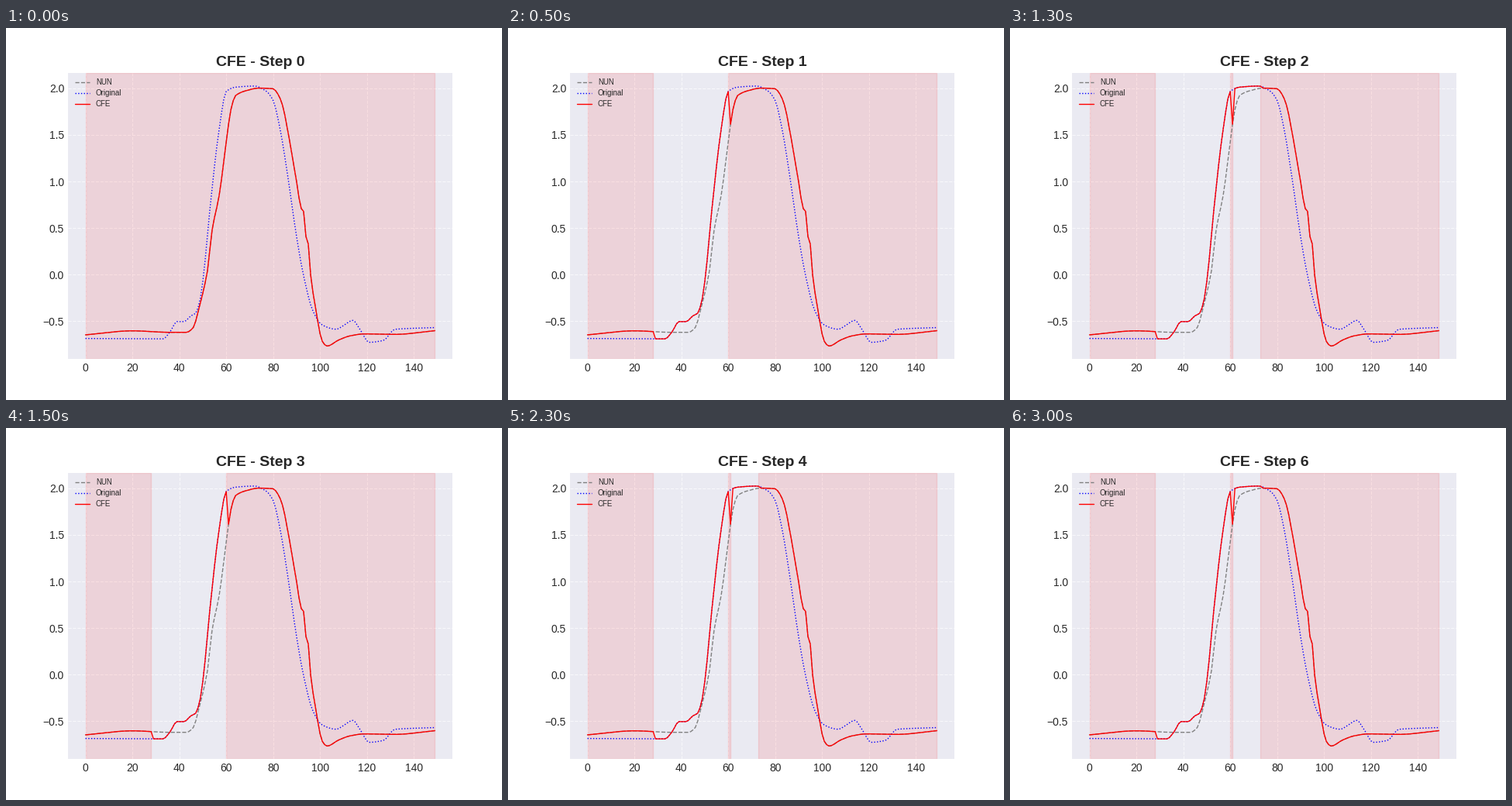
These frames come from a looping animation (640 by 480 pixels, 3500 ms). A matplotlib script:

```python
import matplotlib.pyplot as plt
import numpy as np
from matplotlib.animation import FuncAnimation

plt.rcParams.update({
    "font.family": "Liberation Sans",
    "text.color": ".15",
    "xtick.color": ".15",
    "ytick.color": ".15",
    "xtick.major.size": 0,
    "ytick.major.size": 0,
    "axes.facecolor": "#EAEAF2",
    "axes.edgecolor": "white",
    "axes.linewidth": 0,
    "axes.axisbelow": True,
    "grid.color": "white",
    "lines.solid_capstyle": "round",
    "legend.frameon": False,
})

LAST = 149
STEPS = 7
t = np.arange(LAST + 1)


def smooth(*keys):
    """Monotone cubic curve through the key points, sampled at every t."""
    x, y = np.array(keys, float).T
    h = np.diff(x)
    slope = np.diff(y) / h
    a, b = slope[:-1], slope[1:]
    same = a * b > 0
    inner = np.where(same, 2 * a * b / np.where(same, a + b, 1), 0)
    m = np.concatenate([slope[:1], inner, slope[-1:]])
    i = np.clip(np.searchsorted(x, t, side="right") - 1, 0, len(h) - 1)
    u = (t - x[i]) / h[i]
    ease = u * u * (3 - 2 * u)
    bend = h[i] * u * (1 - u) * ((1 - u) * m[i] - u * m[i + 1])
    return y[i] + (y[i + 1] - y[i]) * ease + bend


base = smooth(
    (0, -.684), (33, -.688), (36, -.615), (39, -.503), (42, -.503),
    (45, -.44), (47, -.413), (49, -.25), (51, .15), (53, .69),
    (57, 1.56), (60, 1.965), (64, 2.012), (72, 2.024), (77, 1.97),
    (80, 1.87), (83, 1.56), (86, 1.1), (90, .41), (93, -.01),
    (97, -.39), (101, -.54), (107, -.585), (110, -.545), (114, -.49),
    (117, -.585), (121, -.725), (127, -.705), (132, -.585), (149, -.567))

neighbour = smooth(
    (0, -.645), (20, -.602), (36, -.618), (43, -.618), (46, -.565),
    (48, -.4), (51, -.09), (52, .04), (54, .48), (57, .85),
    (60, 1.42), (62, 1.77), (64, 1.922), (69, 1.978), (74, 2.002),
    (80, 1.995), (82, 1.94), (84, 1.82), (86, 1.58), (90, 1),
    (92, .71), (93, .68), (94, .41), (95, .33), (96, 0),
    (98, -.34), (101, -.715), (103, -.765), (108, -.7), (113, -.655),
    (119, -.635), (132, -.64), (149, -.6))


def kept_spans(step):
    """Ranges of the series that still follow the neighbour."""
    if step == 0:
        return [(0, LAST)]
    if step % 2:
        return [(0, 28), (60, LAST)]
    return [(0, 28), (60, 61), (73, LAST)]


def blend(spans):
    mixed = base.copy()
    for start, end in spans:
        first = start + 1 if start else 0
        mixed[first:end + 1] = neighbour[first:end + 1]
    return mixed


fig, ax = plt.subplots(figsize=(6.4, 4.8), dpi=100)
fig.subplots_adjust(left=.125, right=.9, bottom=.11, top=.88)


def draw(step):
    ax.clear()
    spans = kept_spans(step)
    ax.plot(t, neighbour, "--", color="gray", lw=1, label="NUN")
    ax.plot(t, base, ":", color="blue", lw=1, label="Original")
    ax.plot(t, blend(spans), "-", color="red", lw=1, label="CFE")
    for start, end in spans:
        ax.axvspan(start, end, color="red", alpha=.1)
    ax.set_xlim(-LAST * .05, LAST * 1.05)
    ax.set_ylim(-.905, 2.168)
    ax.set_xticks(range(0, 141, 20))
    ax.set_yticks(np.arange(-.5, 2.1, .5))
    ax.grid(True, linestyle="--", alpha=.7)
    ax.set_title(f"CFE - Step {step}", fontsize=14, fontweight="bold")
    ax.legend(loc="upper left", bbox_to_anchor=(0, 1.003), fontsize=7,
              labelspacing=.4)
    return ax.get_children()


anim = FuncAnimation(fig, draw, frames=STEPS, interval=500,
                     init_func=lambda: draw(0), repeat=True, repeat_delay=0)
plt.show()
```
